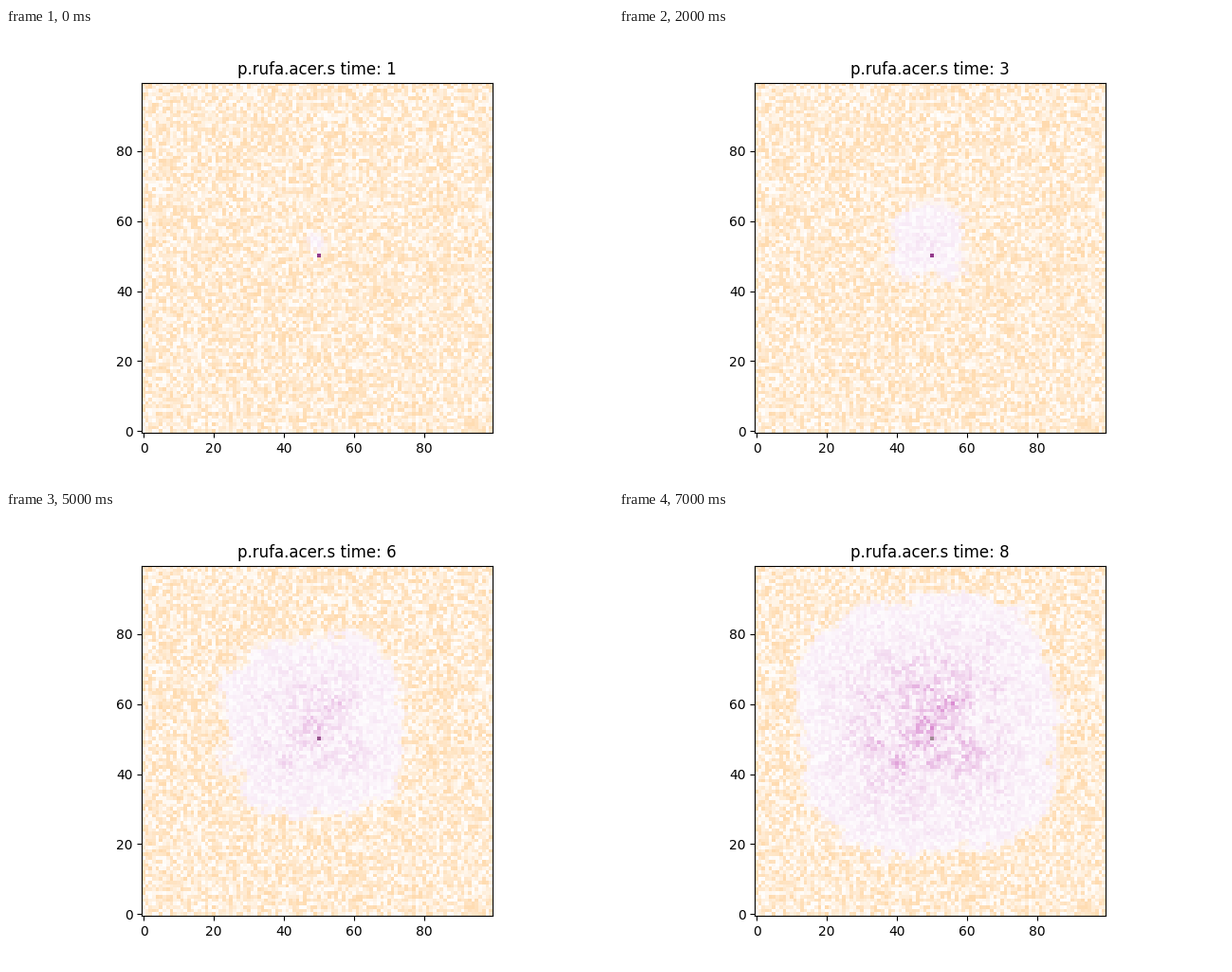
Animation, 640 px wide and 480 px high, one loop 8 s. Source, as a matplotlib script:

```python
import numpy as np
import matplotlib.pyplot as plt
from matplotlib.animation import FuncAnimation

N = 100
STEPS = 8
CENTRE = (49, 54)
SEED_CELL = (50, 50)

# Ink taken away from white, per channel
FOOD_INK = np.array([0, 37, 82])
COLONY_INK = np.array([34, 106, 42])

FRESH = np.array([148, 58, 140])
FADED = np.array([158, 138, 146])

rng = np.random.default_rng(11)


def smooth_noise(passes):
    """Blurred random field with unit spread."""
    field = rng.normal(size=(N, N))
    for _ in range(passes):
        field = sum(np.roll(field, s, axis) for axis in (0, 1) for s in (-1, 0, 1)) / 6
    return field / field.std()


food = rng.random((N, N))
texture = 0.1 + rng.random((N, N))
ragged = 1.1 * smooth_noise(6) + 0.7 * smooth_noise(1)
clump = np.clip(0.9 + 0.4 * smooth_noise(4), 0.2, None)

y, x = np.mgrid[:N, :N]
dx, dy = x - CENTRE[0], y - CENTRE[1]
dist = np.hypot(dx, dy)
lobes = 1 + 0.06 * np.cos(4 * (np.arctan2(dy, dx) - np.radians(50)))


def colony_image(t):
    age = t - 1
    radius = 3.8 + 4.15 * age + 0.15 * age ** 2
    depth = np.clip(radius * lobes - dist + ragged * min(1, t / 4), 0, None)
    cover = np.clip(depth / 2.5, 0, 1)
    density = cover * texture * (0.17 + 0.6 * clump * (depth / 40) ** 1.7)
    image = (255 - (food * (1 - cover))[..., None] * FOOD_INK
             - density[..., None] * COLONY_INK)
    fade = np.clip((t - 5) / 3, 0, 1)
    image[SEED_CELL[1], SEED_CELL[0]] = FRESH + fade * (FADED - FRESH)
    return np.clip(image, 0, 255).astype(np.uint8)


fig, ax = plt.subplots(figsize=(6.4, 4.8), dpi=100)
picture = ax.imshow(colony_image(1), origin="lower", interpolation="nearest")
title = ax.set_title("")


def update(frame):
    t = frame + 1
    picture.set_data(colony_image(t))
    title.set_text(f"p.rufa.acer.s time: {t}")
    return picture, title


anim = FuncAnimation(fig, update, frames=STEPS, interval=1000, repeat=True)
plt.show()
```
